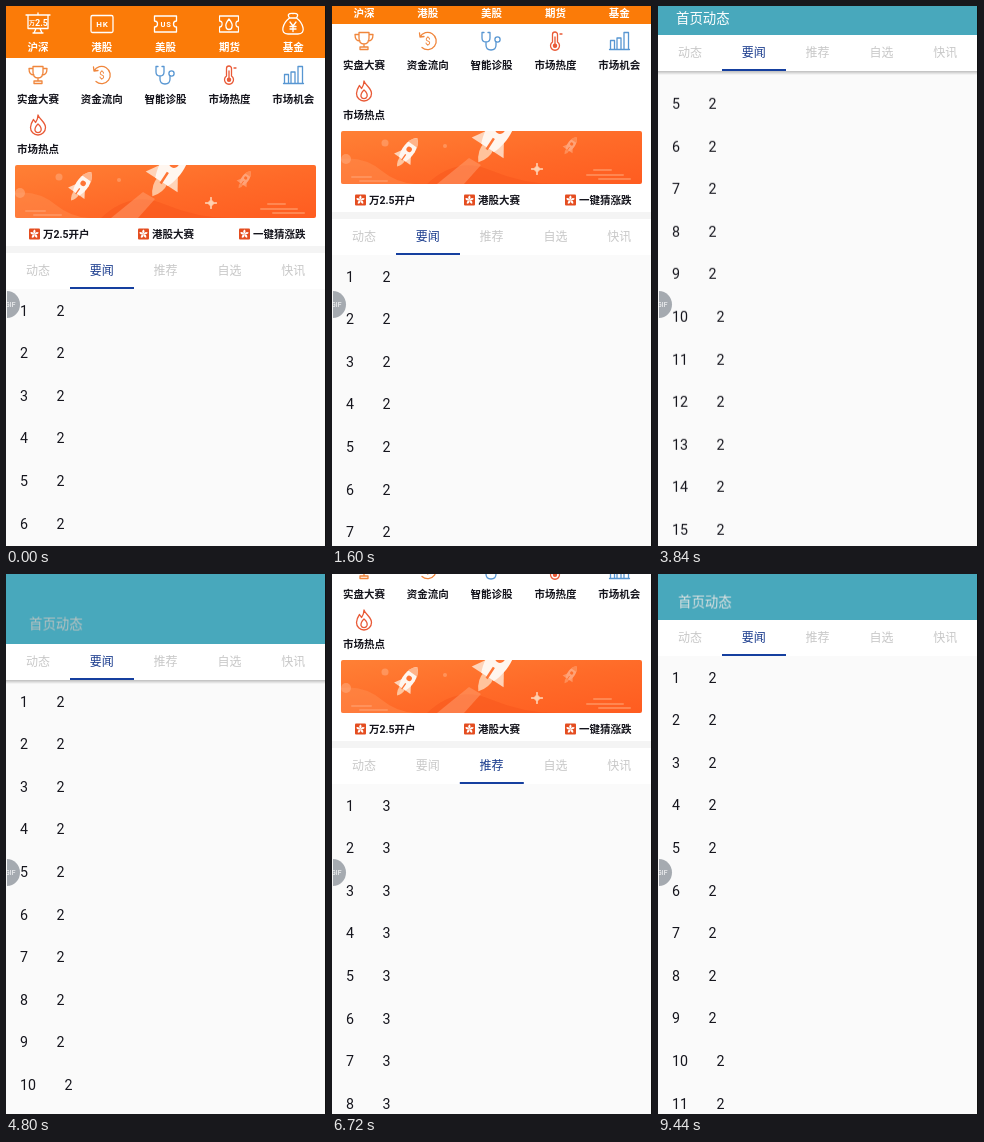
An HTML page that plays this animation: 320x540 px, repeating every 9600 ms.

```html
<!DOCTYPE html>
<html lang="zh-CN">
<head>
<meta charset="utf-8">
<title>首页动态</title>
<style>
  html, body { margin: 0; width: 100%; height: 100%; overflow: hidden; background: #fafafa; }
  svg { display: block; width: 320px; height: 540px; }
  text { font: 10.5px Roboto, "Noto Sans CJK SC", "Noto Sans CJK", sans-serif; fill: #15151d; }
  .mid { text-anchor: middle; }
  .bold { font-weight: 700; }
  .row { font-size: 14.2px; }
  .tab { font-size: 12px; }
  .line { fill: none; stroke-width: 1.3; stroke-linecap: round; stroke-linejoin: round; }
  .white { stroke: #fff; }
  .orange { stroke: #f0863c; }
  .red { stroke: #e95a37; }
  .blue { stroke: #5796d2; }
  .white text { fill: #fff; stroke: none; font-weight: 700; }
</style>
</head>
<body>
<svg viewBox="0 0 320 540">
  <defs>
    <linearGradient id="sky" x2="1" y2="1">
      <stop stop-color="#ff8035"/><stop offset=".55" stop-color="#ff6a28"/><stop offset="1" stop-color="#ff5c20"/>
    </linearGradient>
    <linearGradient id="shade" x2="0" y2="1">
      <stop stop-color="#000" stop-opacity=".24"/><stop offset="1" stop-color="#000" stop-opacity="0"/>
    </linearGradient>
    <clipPath id="bannerClip"><rect x="9" y="159" width="301" height="53" rx="2"/></clipPath>
    <g id="rocket">
      <path d="M-5 2L-10 10H10L5 2Z" fill="#ffd3b8"/>
      <path d="M-3 9Q-4 14 0 19Q4 14 3 9Z" fill="#ffc39c"/>
      <path d="M0-16C8-9 7 3 4 10H-4C-7 3-8-9 0-16Z" fill="#fff6ef"/>
      <path d="M0-16Q4-13 5.6-8H-5.6Q-4-13 0-16Z" fill="#ffb48a"/>
      <circle cy="-2" r="2.7" fill="#ff7434"/>
      <path d="M0 4V11" stroke="#ff7434" stroke-width="1.3"/>
    </g>
    <g id="flower">
      <rect x="-5.5" y="-5.5" width="11" height="11" rx="1" fill="#e44d20"/>
      <g id="petals" fill="#fff"></g>
    </g>
    <path id="ticket" d="M-11-8H11V-3A3 3 0 0 0 11 3V8H-11V3A3 3 0 0 0-11-3Z"/>
  </defs>

  <rect width="320" height="540" fill="#fafafa"/>
  <g id="pages"><g id="pageA"></g><g id="pageB" transform="translate(319 0)"></g></g>

  <g id="app">
    <g id="spinner" transform="translate(128 -48)" stroke-width="1.6" stroke-linecap="round"></g>
    <text x="154" y="-43.6" style="font-size:12px;fill:#333">松开刷新...</text>

    <rect y="-28" width="320" height="80" fill="#fb7b08"/>
    <rect y="52" width="320" height="188" fill="#fff"/>
    <rect y="240" width="320" height="7" fill="#f4f4f4"/>

    <g class="line white">
      <path d="M20 9H44M22 9V22.5H42V9M32 7V9M28 27L30 22.5M36 27L34 22.5M27 27H37"/>
      <text x="23" y="18.5" style="font-size:6px">万</text>
      <text x="29" y="19.5" style="font-size:9px">2.5</text>
      <rect x="85" y="9.5" width="22" height="17" rx="1.5"/>
      <text class="mid" x="96.5" y="21" style="font-size:8px;letter-spacing:1px">HK</text>
      <use href="#ticket" x="159.5" y="18"/>
      <text class="mid" x="160" y="20.8" style="font-size:7.5px;letter-spacing:.8px">US</text>
      <use href="#ticket" transform="translate(223 18) scale(.86 1)"/>
      <path d="M223 13Q227 18 226 20.5A3 3 0 0 1 220 20.5Q219 18 223 13Z"/>
      <path d="M283.5 12Q280 7 287 7.5Q294 7 290.5 12ZM283.5 12C277 17 273 28 282 28H292C301 28 297 17 290.5 12"/>
      <path d="M284 16L287 20L290 16M287 20V25.5M284 20.5H290M284 23H290"/>
    </g>

    <g class="line orange">
      <path d="M27 60.5H37V66Q37 72 32 72T27 66ZM27 62.5H23Q23 69 28 69M37 62.5H41Q41 69 36 69M32 72V75M28 77.5V75H36V77.5Z"/>
      <path d="M88 65A8.6 8.6 0 1 1 90 75.5M87.5 61L88 65L92 64.5"/>
      <text class="mid" x="95.800" y="73" style="font-size:10px;fill:#f0863c;stroke:none">$</text>
    </g>
    <g class="line blue">
      <path d="M152 60.5H150V66Q150 70 154 70T158 66V60.5H156M154 70V73Q154 78 159 78T164 73V70"/>
      <circle cx="165.5" cy="67.5" r="2.6"/>
      <path d="M277.500 77.5H297.5M278.5 77V68.5H282.5V77M285 77V66H289V77M292 77V60.5H296.5V77"/>
    </g>
    <g class="line red">
      <path d="M220.5 70V62.5A2.5 2.5 0 0 1 225.5 62.5V70A4.5 4.5 0 1 1 220.5 70ZM223 65V72M228 62H230"/>
      <circle cx="223" cy="73.7" r="1.6" fill="#e95a37"/>
      <path d="M32 109C33 113 39.5 116 39.5 121.5A7.5 7.5 0 0 1 24.5 121.5Q25 117 27.5 113.5L29.5 116.5Q32 113 32 109Z"/>
      <path d="M32 118Q36 121.5 35 124.5A3.2 3.2 0 0 1 29 124.5Q28.5 121.5 32 118Z"/>
    </g>
    <g id="labels"></g>

    <g clip-path="url(#bannerClip)">
      <rect x="9" y="159" width="301" height="53" fill="url(#sky)"/>
      <path d="M9 187Q32 184 50 199T95 212H9Z" fill="#ff9358" opacity=".4"/>
      <path d="M95 212Q125 184 158 198T225 212Z" fill="#f4501b" opacity=".4"/>
      <path d="M105 212L137 186L149 193L132 212Z" fill="#ffa77b" opacity=".45"/>
      <g fill="#ffa878" opacity=".6">
        <circle cx="53" cy="171" r="3.5"/><circle cx="14" cy="187" r="5"/><circle cx="113" cy="174" r="2"/>
      </g>
      <use href="#rocket" transform="translate(239 173) rotate(35) scale(.6)" opacity=".4"/>
      <use href="#rocket" transform="translate(76 179) rotate(35)"/>
      <use href="#rocket" transform="translate(166 160) rotate(33) scale(1.9)"/>
      <path d="M205 191Q205 197 211 197Q205 197 205 203Q205 197 199 197Q205 197 205 191Z" fill="#ffd0b0" stroke="#ffd0b0"/>
      <path d="M255 203H291M262 198H279M267 207H298M20 205H39M28 209H55" stroke="#ffa170" stroke-width="2" stroke-linecap="round" opacity=".6"/>
    </g>
    <g id="links"></g>

    <rect id="scrim" y="-28" width="320" height="275" fill="#48a8bc"/>
    <text id="title" style="font-size:13.4px">首页动态</text>
    <rect id="shadow" y="283" width="320" height="4" fill="url(#shade)"/>
    <rect y="247" width="320" height="36" fill="#fff"/>
    <g id="tabs"></g>
    <rect id="marker" x="64" y="281" width="64" height="2" fill="#153f9f"/>
  </g>

  <path d="M1 285A13 13.5 0 0 1 1 312Z" fill="#a5aab0"/>
  <text x="-1" y="301" style="font-size:7px;fill:#fff">GIF</text>
  <rect x="319" width="1" height="540" fill="#111"/>
</svg>

<script>
const LOOP = 9600, TICK = 160, PAGE = 319, COLLAPSED = -218;
const $ = id => document.getElementById(id);

const linear = p => p;
const speedUp = p => p ** 1.5;
const slowDown = p => Math.sin(p * Math.PI / 2);
const smooth = p => p * p * (3 - 2 * p);

// Each move: first change, last change, value reached, easing
const shift = [
  [480, 960, 100, slowDown], [1120, 1280, 0, linear],
  [1600, 2080, COLLAPSED, smooth],
  [4320, 4800, -177, speedUp], [4960, 5600, -73, slowDown],
  [7200, 8000, -203, slowDown], [9440, 9440, -201, linear],
];
const scroll = [[2080, 2560, 803, smooth], [3200, 4160, 0, smooth]];
const page = [[6080, 6720, 1, smooth], [8320, 8800, 0, smooth]];
const scrim = [[1920, 2400, 1, linear], [4960, 5440, 0, linear], [7520, 8160, 1, slowDown]];
const shadow = [[1920, 2080, 1, linear], [4960, 5120, 0, linear]];

function valueAt(track, time) {
  let value = 0;
  for (const [start, end, to, ease] of track) {
    if (time < start) break;
    const p = Math.min(1, (time - start + TICK) / (end - start + TICK));
    value += (to - value) * ease(p);
  }
  return value;
}

const steps = Array.from({ length: LOOP / TICK }, (_, i) => {
  const at = track => valueAt(track, i * TICK);
  return { shift: Math.round(at(shift)), scroll: at(scroll), page: at(page), scrim: at(scrim), shadow: at(shadow) };
});

function play(el, style) {
  const frames = steps.map((s, i) => ({ offset: i / steps.length, easing: 'steps(1, end)', ...style(s) }));
  frames.push({ ...frames[frames.length - 1], offset: 1 });
  el.animate(frames, { duration: LOOP, iterations: Infinity });
}

function add(parent, tag, attrs, content = '') {
  const el = document.createElementNS('http://www.w3.org/2000/svg', tag);
  for (const name in attrs) el.setAttribute(name, attrs[name]);
  el.textContent = content;
  return parent.appendChild(el);
}

const move = (x, y) => ({ transform: `translate(${x}px, ${y}px)` });
const columnX = i => 32 + i * 63.8;

function label(text, column, y, color = '#15151d') {
  add($('labels'), 'text', { class: 'mid bold', x: columnX(column), y }, text).style.fill = color;
}
['沪深', '港股', '美股', '期货', '基金'].forEach((s, i) => label(s, i, 45.2, '#fff'));
['实盘大赛', '资金流向', '智能诊股', '市场热度', '市场机会'].forEach((s, i) => label(s, i, 97));
label('市场热点', 0, 146.8);

for (let i = 0; i < 12; i++) {
  const gray = 130 + i * 8;
  add($('spinner'), 'path', { d: 'M0-4.5V-7.7', transform: `rotate(${i * 30})`, stroke: `rgb(${gray},${gray},${gray})` });
}
for (let i = 0; i < 5; i++) {
  add($('petals'), 'path', { d: 'M0 0Q-2.6-2.5 0-4.5Q2-3 0 0Z', transform: `rotate(${i * 72})` });
}

[['万2.5开户', 37], ['港股大赛', 146], ['一键猜涨跌', 247]].forEach(([name, x]) => {
  add($('links'), 'use', { href: '#flower', x: x - 8.5, y: 228 });
  add($('links'), 'text', { class: 'bold', x, y: 232 }, name);
});

function fillPage(parent, count, value) {
  for (let n = 1; n <= count; n++) {
    const y = 309.5 + (n - 1) * 42.6;
    add(parent, 'text', { class: 'row', x: 14, y }, n);
    add(parent, 'text', { class: 'row', x: n < 10 ? 50.5 : 58.5, y }, value);
  }
}
fillPage($('pageA'), 40, 2);
fillPage($('pageB'), 16, 3);

['动态', '要闻', '推荐', '自选', '快讯'].forEach((name, i) => {
  const tab = add($('tabs'), 'text', { class: 'tab mid', x: columnX(i), y: 269.4 }, name);
  play(tab, s => ({ fill: i === (s.page > .5 ? 2 : 1) ? '#17398c' : '#c8c8c8' }));
});

play($('app'), s => move(0, s.shift));
play($('pages'), s => move(-PAGE * s.page, s.shift));
play($('pageA'), s => move(0, -s.scroll));
play($('marker'), s => move(63.8 * s.page, 0));
play($('scrim'), s => ({ opacity: s.scrim }));
play($('shadow'), s => ({ opacity: s.shadow }));
play($('title'), s => {
  const open = s.shift - COLLAPSED, k = open / -COLLAPSED;
  const channel = rate => Math.max(0, Math.round(255 - rate * k));
  return {
    ...move(18 + open * .125, 234.5 - open * .085),
    fill: `rgb(${channel(130)}, ${channel(270)}, ${channel(320)})`,
    opacity: s.scrim * Math.max(0, 1 - 1.5 * k),
  };
});
</script>
</body>
</html>
```
